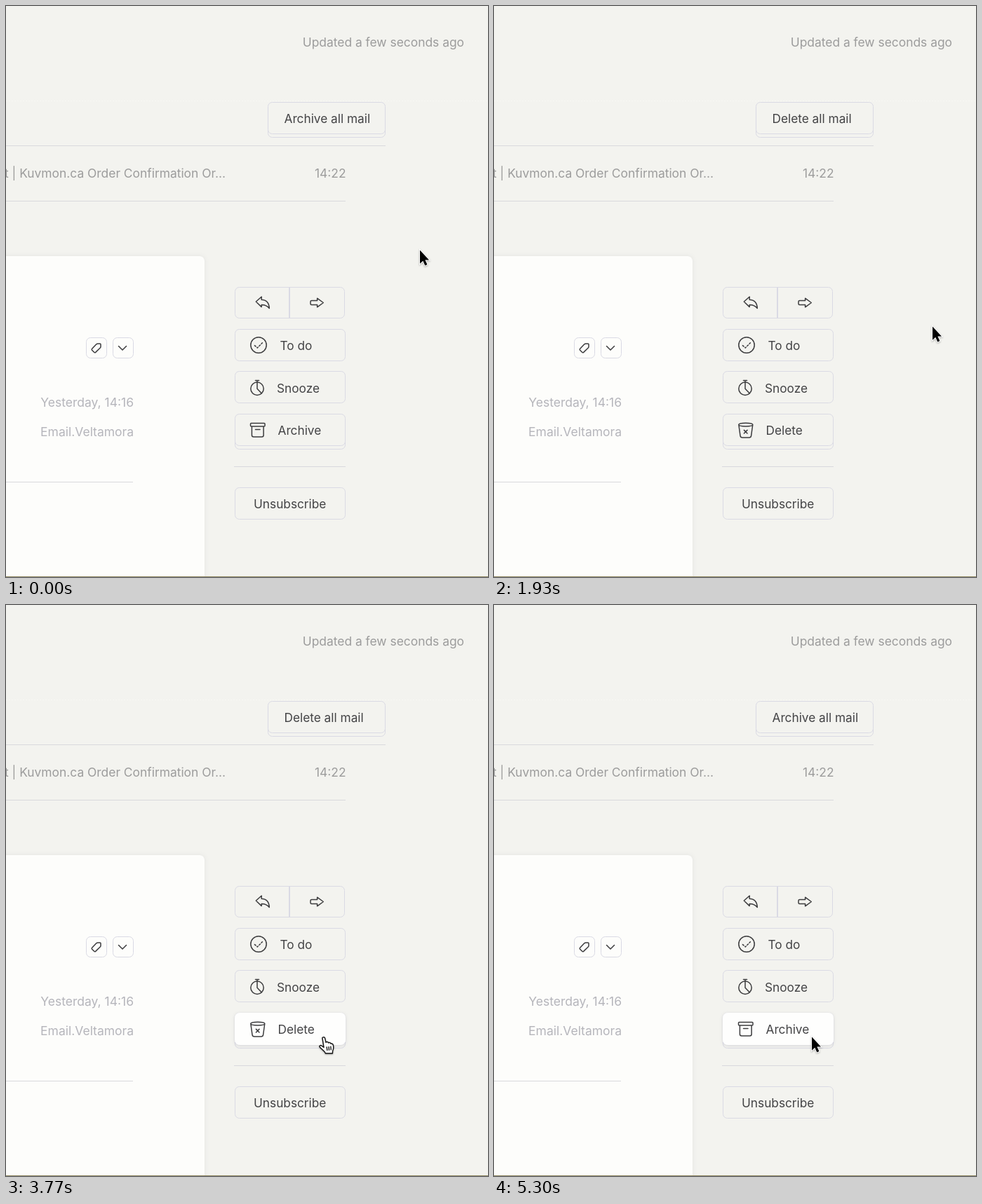
Recreate the animation shown at these times as an HTML page. Size 687 by 815 pixels, loop 5330 ms.

```html
<!DOCTYPE html>
<html lang="en">
<head>
<meta charset="utf-8">
<title>Mail actions</title>
<style>
  html, body { margin: 0; width: 100%; height: 100%; overflow: hidden; background: #f3f3ef; }
  svg { display: block; width: 687px; height: 815px; }
  text { font: 400 17.25px Inter, "Liberation Sans", sans-serif; fill: #434345; }
  .muted text { font-size: 17.4px; fill: #9c9c9c; }
  .faint text { font-size: 17.5px; fill: #b5b5bb; }
  .end { text-anchor: end; }
  .btn { fill: #f3f3ef; stroke: #dadae4; }
  .hover { fill: #fefefd; stroke: #fefefd; filter: drop-shadow(0 1px 2px rgba(70, 70, 110, .18)); }
  .icon { fill: none; stroke: #3c3c3e; stroke-width: 1.5; stroke-linecap: round; stroke-linejoin: round; }
  .rule { fill: none; stroke: #d9d9dd; }
</style>
</head>
<body>
<svg id="stage" viewBox="0 0 687 815" xmlns="http://www.w3.org/2000/svg">
  <rect width="687" height="815" fill="#f3f3ef"/>
  <path d="M0 135.5H687" stroke="#f8f8f4" stroke-dasharray="2 2"/>
  <path class="rule" d="M0 199.5H541M0 278.5H484M325 657.5H484"/>
  <g class="muted">
    <text class="end" x="653" y="57.5">Updated a few seconds ago</text>
    <text class="end" x="313" y="245">t | Kuvmon.ca Order Confirmation Or...</text>
    <text class="end" x="484.5" y="245">14:22</text>
  </g>

  <rect x="-20" y="357" width="303" height="480" rx="7" fill="#fdfdfb"
        style="filter:drop-shadow(0 0 3px rgba(60,60,80,.09))"/>
  <path class="rule" d="M0 679.5H181"/>
  <g class="faint">
    <text class="end" x="182" y="572">Yesterday, 14:16</text>
    <text class="end" x="182" y="613.5">Email.Veltamora</text>
  </g>
  <g class="btn" style="fill:#fdfdfb">
    <rect x="114.5" y="473.5" width="29" height="29" rx="6"/>
    <rect x="152.5" y="473.5" width="29" height="29" rx="6"/>
  </g>
  <path class="icon" d="M122.6 489.2L129 482.6Q129.8 481.9 131 481.9H134Q135 482 135 483V486.2Q135 487.2 134.2 488L127.6 494.4Q126.6 495.2 125.7 494.3L122.6 491.2Q121.8 490.2 122.6 489.2ZM160.5 485.5L166 491L171.5 485.5"/>

  <g class="btn">
    <rect x="326.5" y="401.5" width="156" height="44" rx="6"/>
    <path d="M404 401V445" stroke-width="2"/>
    <rect x="326.5" y="461.5" width="157" height="45" rx="6"/>
    <rect x="326.5" y="521.5" width="157" height="45" rx="6"/>
    <rect x="326.5" y="687.5" width="157" height="45" rx="6"/>
  </g>
  <g class="icon">
    <path d="M356.3 422L364.2 415V419.2C371 419.4 375 424 375.3 431.6C372.4 427.6 369 426.3 364.2 426.4V429.6Z"/>
    <path d="M435.6 420.5H443.6V417.2L452.3 423.5L443.6 429.8V426.5H435.6Q434 426.5 434 425V422Q434 420.5 435.6 420.5Z"/>
    <circle cx="360" cy="484" r="11.2"/>
    <path d="M354.5 484.6L358.3 488L365.5 480.6" stroke-dasharray="2 2.4"/>
    <circle cx="358" cy="546.2" r="9.2"/>
    <path d="M355.5 534.5H360.5M358 534.5V546.2L364.2 552.8"/>
  </g>
  <text x="390.5" y="491">To do</text>
  <text x="386" y="551.5">Snooze</text>
  <text x="353" y="717">Unsubscribe</text>

  <g id="topStack"></g>
  <g id="sideStack"></g>
  <path d="M0 814.5H687" stroke="#948c66"/>

  <g id="cursor" style="filter:drop-shadow(0 1.5px 1.2px rgba(0,0,0,.3))">
    <path id="arrow" d="M1 .5V19.8L5.3 15.8L8.3 22.4L11.4 21L8.4 14.5H14Z"
          stroke="#fff" stroke-width="2" paint-order="stroke"/>
    <g id="hand" transform="translate(-6 0)" stroke="#111" stroke-width="1.4" stroke-linejoin="round" stroke-linecap="round">
      <path fill="#fff" d="M5 2.5C4.6.4 8 .2 8.6 2.3L10 8.3C10.6 7 13.2 7.2 13.5 9C14.6 8 16.7 8.6 17 10.2C18.6 9.6 20 10.6 20.4 12.4C21.3 16.5 20.8 18 19.6 20.5L19.4 24H9.4C8.6 21 4.2 18.4 1.2 15C.2 13.2 2.4 11.8 4 13.2L7 15.4Z"/>
      <path d="M11.2 15L11.8 19.5M14 14.6L14.5 19.2M16.8 14.2L17.2 18.8"/>
    </g>
  </g>
</svg>
<script>
const LOOP = 5330;
const SWAP_TO_DELETE = 600, SWAP_TO_ARCHIVE = 4530, CROSSING = 215;
const RISE = [[0, 5], [200, -8], [430, 3], [650, 0]];
const SINK = [[0, 0], [200, 18.5], [430, 5]];
const ICONS = {
  archive: "M349.5 595.5H368Q369 595.5 369 596.5V599Q369 600 368 600H349.5Q348.5 600 348.5 599V596.5Q348.5 595.5 349.5 595.5ZM350.4 600V612.5Q350.4 615 353 615H364.6Q367.1 615 367.1 612.5V600M355.5 604.5H362",
  remove: "M348.8 597.5C348.8 594.4 368.8 594.4 368.8 597.5C368.8 600.7 348.8 600.7 348.8 597.5L351 613.4Q351.4 616 354 616H363.6Q366.2 616 366.6 613.4L368.8 597.5M356.4 605.4L361 610M361 605.4L356.4 610"
};

const byId = id => document.getElementById(id);
const clamp = v => Math.min(1, Math.max(0, v));
const ease = u => .5 - .5 * Math.cos(Math.PI * clamp(u));
const ramp = (t, from, to) => ease((t - from) / (to - from));

function along(keys, t) {
  let value = keys[0][1];
  for (let i = 1; i < keys.length; i++) {
    value += (keys[i][1] - keys[i - 1][1]) * ramp(t, keys[i - 1][0], keys[i][0]);
  }
  return value;
}

function bezier([ax, ay], [bx, by], [cx, cy], s) {
  const mix = (a, b, c) => a * (1 - s) ** 2 + 2 * b * s * (1 - s) + c * s * s;
  return [mix(ax, bx, cx), mix(ay, by, cy)];
}

function addButton(stack, x, y, w, labelX, label, icon) {
  const g = document.createElementNS("http://www.w3.org/2000/svg", "g");
  g.innerHTML = `<rect class="btn" x="${x}" y="${y}" width="${w}" height="45" rx="6"/>
    <rect class="hover" x="${x}" y="${y}" width="${w}" height="45" rx="6" opacity="0"/>
    ${icon ? `<path class="icon" d="${icon}"/>` : ""}
    <text x="${labelX}" y="${y + 29.5}">${label}</text>`;
  stack.append(g);
  return { g, base: g.children[0], glow: g.children[1] };
}

function makeStack(id, x, y, w, labelX, suffix, icons) {
  const stack = byId(id);
  return {
    stack,
    remove: addButton(stack, x, y, w, labelX, "Delete" + suffix, icons.remove),
    archive: addButton(stack, x, y, w, labelX, "Archive" + suffix, icons.archive)
  };
}

const topPair = makeStack("topStack", 373.5, 137.5, 167, 396.5, " all mail", {});
const sidePair = makeStack("sideStack", 326.5, 582.5, 157, 387.5, "", ICONS);

function placePair(pair, t) {
  const toArchive = t >= SWAP_TO_ARCHIVE;
  const local = t - (toArchive ? SWAP_TO_ARCHIVE : SWAP_TO_DELETE);
  const incoming = toArchive ? pair.archive : pair.remove;
  const outgoing = toArchive ? pair.remove : pair.archive;
  incoming.g.setAttribute("transform", `translate(0 ${along(RISE, local)})`);
  outgoing.g.setAttribute("transform", `translate(0 ${along(SINK, local)})`);
  const front = local < CROSSING ? outgoing : incoming;
  if (pair.stack.lastChild !== front.g) pair.stack.append(front.g);
}

function cursorAt(t) {
  if (t < 2350) return bezier([589, 348], [612, 396], [624, 457], ramp(t, 0, 550));
  return bezier([624, 457], [630, 540], [452, 616], ramp(t, 2350, 3238));
}

function render(t) {
  placePair(topPair, t);
  placePair(sidePair, t);

  const [x, y] = cursorAt(t);
  byId("cursor").setAttribute("transform", `translate(${x} ${y})`);
  const pointing = t > 2350 && x < 483 && t < SWAP_TO_ARCHIVE;
  byId("hand").style.display = pointing ? "" : "none";
  byId("arrow").style.display = pointing ? "none" : "";

  // The hovered button loses its fill as the highlight passes to the other one.
  const s = t - SWAP_TO_ARCHIVE;
  sidePair.remove.glow.setAttribute("opacity", ramp(t, 3040, 3200) * (1 - ramp(s, 0, 180)));
  sidePair.archive.glow.setAttribute("opacity", ramp(s, 40, 200));
  sidePair.remove.base.setAttribute("fill-opacity", s >= 0 && s < CROSSING ? 0 : 1);
}

const start = performance.now();
function tick() {
  render((performance.now() - start) % LOOP);
  requestAnimationFrame(tick);
}
tick();
</script>
</body>
</html>
```
